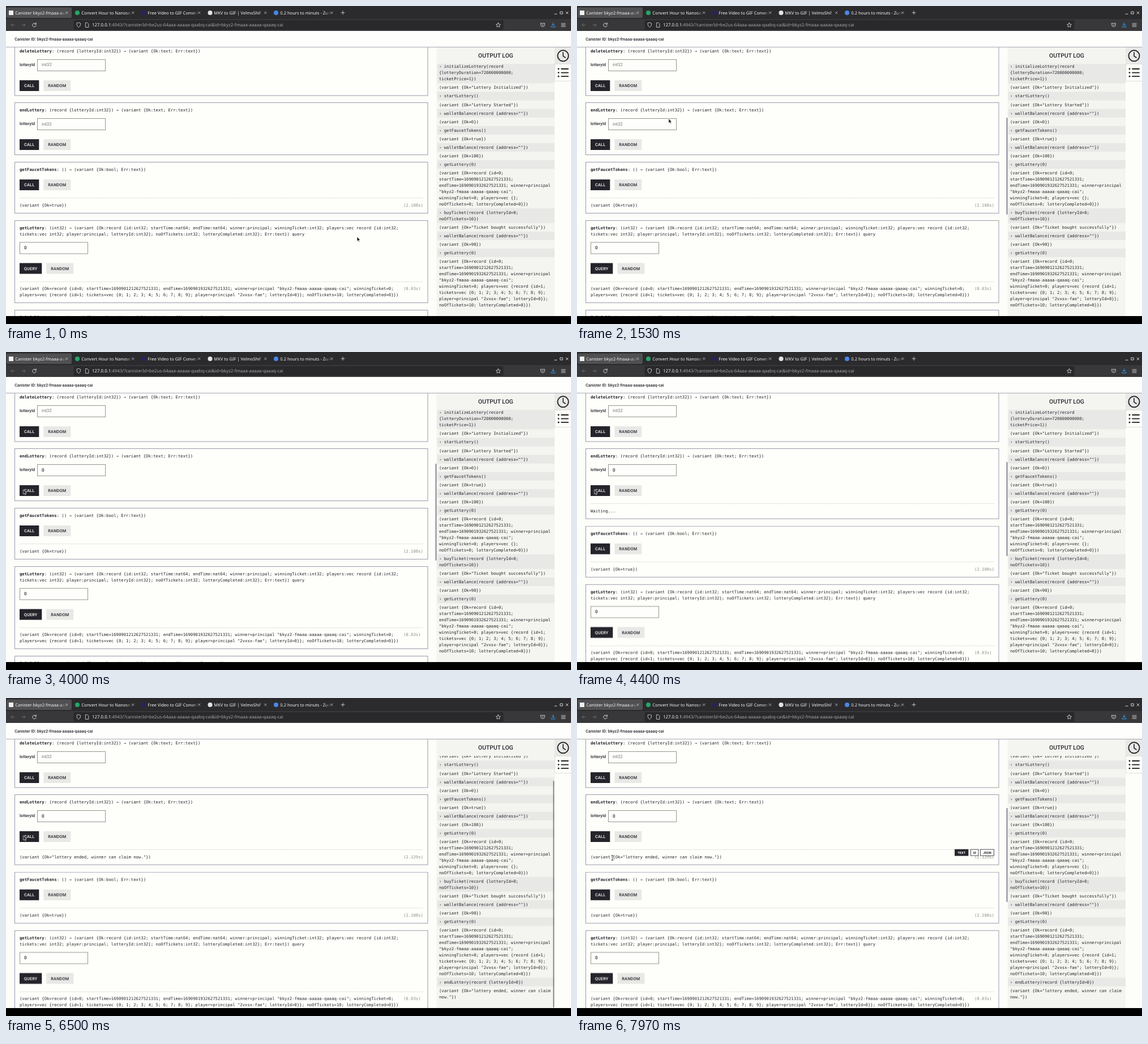
An HTML page that plays this animation: 998 px wide and 561 px high, repeating every 8 s.

```html
<!DOCTYPE html>
<html lang="en">
<head>
<meta charset="utf-8">
<title>Canister console</title>
<style>
html, body { margin: 0; width: 100%; height: 100%; overflow: hidden; background: #000; }
svg { display: block; }
text { font: 7.277px "DejaVu Sans Mono", monospace; fill: #25242b; text-rendering: geometricPrecision; white-space: pre; }
.b { font-weight: 700; }
.dim { fill: #8a8a88; }
.input { font: 500 7.9px Roboto, sans-serif; }
.hint { font: 7.9px Roboto, sans-serif; fill: #777775; }
.ui { font: 500 7.28px Roboto, sans-serif; }
.btn { font: 500 7.28px Roboto, sans-serif; letter-spacing: .2px; text-anchor: middle; }
.pill { font: 700 5.7px Roboto, sans-serif; text-anchor: middle; }
.head { font: 500 10.4px Roboto, sans-serif; text-anchor: middle; }
.tab { font: 7.55px "Noto Sans", sans-serif; fill: #f4f4f4; }
.url { font: 7.85px "Noto Sans", sans-serif; fill: #a6a6a6; }
.lit { fill: #f4f4f4; }
.w { fill: #fff; }
.line { fill: none; stroke-linecap: round; stroke-linejoin: round; }
</style>
</head>
<body>
<svg id="stage" width="998" height="561" viewBox="0 0 998 561"></svg>
<script>
const INK = '#25242b', PAGE = '#fdfdf9', EDGE = '#9a9aad', GREY = '#e8e8e6', PANEL = '#f4f4f0';
const TABS = '#2b2b2d', BAR = '#38383a', FIELD = '#29292b', ACTIVE = '#505052';
let css = '';

// Keyframe helpers; times are ms within the 8 s loop.
const anim = (name, ease, ...keys) => {
  const body = keys.map(([ms, rule]) => `${ms / 80}%{${rule}}`).join('');
  css += `@keyframes ${name}{${body}} .${name}{animation:${name} 8s ${ease} infinite}`;
};
const show = (name, ...flips) => anim(name, 'step-end', [0, 'opacity:0'],
  ...flips.map((ms, i) => [ms, `opacity:${(i + 1) % 2}`]));
const at = (x, y) => `transform:translate(${x}px,${y}px)`;

// Drawing helpers
const text = (x, y, s, cls = '') => `<text x="${x}" y="${y}" class="${cls}">${s}</text>`;
const rect = (x, y, w, h, fill, more = '') =>
  `<rect x="${x}" y="${y}" width="${w}" height="${h}" fill="${fill}" ${more}/>`;
const path = (d, stroke, width = 1, more = '') =>
  `<path d="${d}" class="line" stroke="${stroke}" stroke-width="${width}" ${more}/>`;
const dot = (x, y, r, fill) => `<circle cx="${x}" cy="${y}" r="${r}" fill="${fill}"/>`;
const group = (cls, body) => `<g class="${cls}">${body}</g>`;
const clip = (x, y, w, h, body) =>
  `<svg x="${x}" y="${y}" width="${w}" height="${h}" viewBox="${x} ${y} ${w} ${h}">${body}</svg>`;

// Timeline
const WAIT = 4070, DONE = 5930;
show('before', 0, WAIT);
show('after', WAIT);
show('waiting', WAIT, DONE);
show('done', DONE);
show('empty', 0, 2700);
show('typed', 2700);
show('caret0', 1950, 2700);
show('caret1', 2700, 3770);
show('arrow', 0, 1600, 3200, 7820);
show('beam', 1600, 3200, 7820);
show('pills', 7810);
anim('push', 'step-end', [0, at(0, 0)], [WAIT, at(0, 31.7)], [8000, at(0, 31.7)]);
anim('scroll', 'ease-in-out', [0, at(0, 0)], [DONE, at(0, 0)], [6330, at(0, -41.1)], [8000, at(0, -41.1)]);
anim('logbar', 'linear', [0, 'opacity:0'], [DONE, 'opacity:0;' + at(0, -37)],
  [6050, 'opacity:1;' + at(0, -28)], [6330, 'opacity:1;' + at(0, 0)],
  [6830, 'opacity:1;' + at(0, 0)], [7330, 'opacity:0'], [8000, 'opacity:0']);
anim('pagebar', 'linear', [0, 'opacity:0'], [30, 'opacity:0'], [130, 'opacity:1'], [2630, 'opacity:1'],
  [3000, 'opacity:0'], [3150, 'opacity:0'], [3250, 'opacity:1'], [4970, 'opacity:1'],
  [5450, 'opacity:0'], [6950, 'opacity:0'], [7050, 'opacity:1'], [8000, 'opacity:1']);
anim('move', 'ease-in-out', [0, at(620, 407)], [30, at(620, 407)], [830, at(380, 240)], [870, at(380, 240)],
  [1200, at(277, 172)], [1430, at(277, 172)], [1530, at(161.8, 198.6)], [1730, at(137, 203)],
  [3140, at(137, 203)], [3430, at(37, 240)], [3470, at(37, 240)], [3600, at(32, 243)],
  [3770, at(32, 243)], [3900, at(30.6, 242.6)], [7100, at(30.6, 242.6)], [7600, at(58, 261)],
  [7770, at(58, 261)], [7950, at(62.5, 282)], [8000, at(62.5, 282)]);

// Cards
const frame = (y, h, cls = '') => rect(15.5, y, 729.5, h, '#fefefb', `stroke="${EDGE}" class="${cls}"`);
const title = (y, name, sig) => text(24, y + 15.7, `<tspan class="b">${name}</tspan>${sig}`);
const field = (x, y) => rect(x + .5, y + .5, 120, 20, '#fefefc', 'stroke="#98958e"');
const button = (x, y, w, label, dark) =>
  rect(x, y, w, 19, dark ? INK : GREY) + text(x + w / 2, y + 12.1, label, 'btn' + (dark ? ' w' : ''));
const buttons = (y, label, w) => button(24, y, w, label, true) + button(w + 32, y, 48, 'RANDOM');
const rule = y => path(`M24 ${y}H737`, '#d2d2cc', 1, 'stroke-dasharray="1.5 1" style="stroke-linecap:butt"');
const took = (y, s) => text(702, y, `(${s}s)`, 'dim');
const hint = y => text(63, y, 'int32', 'hint');
const idField = y => text(24, y + 39.7, 'lotteryId', 'ui') + field(55, y + 27.5);
const TEXT_RESULT = ' → (variant {Ok:text; Err:text})';

function deleteCard(y) {
  return frame(y, 91.5) + title(y, 'deleteLottery', ': (record {lotteryId:int32})' + TEXT_RESULT) +
    idField(y) + hint(y + 39.9) + buttons(y + 64.5, 'CALL', 34.3);
}

function pill(x, w, label, dark) {
  return rect(x + .5, 267.1, w - 1, 11, dark ? INK : '#fff', `stroke="${INK}" stroke-width=".8"`) +
    text(x + w / 2, 274.7, label, 'pill' + (dark ? ' w' : ''));
}

function endCard(y) {
  const caret = x => path(`M${x} ${y + 33.5}V${y + 42}`, '#111', .7);
  return frame(y, 92, 'before') + frame(y, 123.7, 'after') +
    title(y, 'endLottery', ': (record {lotteryId:int32})' + TEXT_RESULT) + idField(y) +
    group('empty', hint(y + 40.3)) + group('typed', text(63, y + 40.3, '0', 'input')) +
    group('caret0', caret(63)) + group('caret1', caret(67.8)) +
    buttons(y + 64.5, 'CALL', 34.3) +
    group('after', rule(267.5)) +
    group('waiting', text(24, 283.3, 'Waiting...')) +
    group('done', text(24, 283.3, '(variant {Ok="lottery ended, winner can claim now."})') + took(283.3, '2.129')) +
    group('pills', pill(667, 24.5, 'TEXT', true) + pill(695, 14.5, 'UI') + pill(712, 25, 'JSON'));
}

function faucetCard(y) {
  return frame(y, 90) + title(y, 'getFaucetTokens', ': () → (variant {Ok:bool; Err:text})') +
    buttons(y + 30.5, 'CALL', 34.3) + rule(y + 63) +
    text(24, y + 78.7, '(variant {Ok=true})') + took(y + 78.7, '2.108');
}

function lotteryCard(y) {
  return frame(y, 145) +
    title(y, 'getLottery', ': (int32) → (variant {Ok:record {id:int32; startTime:nat64; endTime:nat64; winner:principal; winningTicket:int32; players:vec record {id:int32;') +
    text(24, y + 26.7, 'tickets:vec int32; player:principal; lotteryId:int32}; noOfTickets:int32; lotteryCompleted:int32}; Err:text}) query') +
    field(24, y + 38) + text(32, y + 50.8, '0', 'input') + buttons(y + 75, 'QUERY', 39.3) + rule(y + 108) +
    text(24, y + 122.4, '(variant {Ok=record {id=0; startTime=1690901212627521331; endTime=1690901932627521331; winner=principal "bkyz2-fmaaa-aaaaa-qaaaq-cai"; winningTicket=0;') +
    text(24, y + 133.3, 'players=vec {record {id=1; tickets=vec {0; 1; 2; 3; 4; 5; 6; 7; 8; 9}; player=principal "2vxsx-fae"; lotteryId=0}}; noOfTickets=10; lotteryCompleted=0}})') +
    took(y + 122.4, '0.03');
}

const nextCard = y => frame(y, 60) +
  title(y, 'initializeLottery', ': (record {lotteryDuration:nat64})' + TEXT_RESULT);

// Output log: entries starting with › are shaded calls, | breaks a line.
const RECORD = '(variant {Ok=record {id=0;|startTime=1690901212627521331;|endTime=1690901932627521331; winner=principal|"bkyz2-fmaaa-aaaaa-qaaaq-cai";|winningTicket=0; players=vec {';
const BALANCE = '› walletBalance(record {address=""})';
const LOG = [
  '› initializeLottery(record|{lotteryDuration=720000000000;|ticketPrice=1})',
  '(variant {Ok="Lottery Initialized"})',
  '› startLottery()', '(variant {Ok="Lottery Started"})',
  BALANCE, '(variant {Ok=0})',
  '› getFaucetTokens()', '(variant {Ok=true})',
  BALANCE, '(variant {Ok=100})',
  '› getLottery(0)', RECORD + '};|noOfTickets=0; lotteryCompleted=0}})',
  '› buyTicket(record {lotteryId=0;|noOfTickets=10})', '(variant {Ok="Ticket bought successfully"})',
  BALANCE, '(variant {Ok=90})',
  '› getLottery(0)',
  RECORD + 'record {id=1;|tickets=vec {0; 1; 2; 3; 4; 5; 6; 7; 8; 9};|player=principal "2vxsx-fae"; lotteryId=0}};|noOfTickets=10; lotteryCompleted=0}})',
  '› endLottery(record {lotteryId=0})', '(variant {Ok="lottery ended, winner can claim|now."})'
];

function logRows() {
  let y = 99.4;
  return LOG.map((entry, i) => {
    const lines = entry.split('|'), h = lines.length * 10.92 + 4.16;
    let row = entry[0] === '›' ? rect(761.5, y, 207.5, h, GREY) : '';
    lines.forEach((s, n) => row += text(765, (y + 10.06 + n * 10.92).toFixed(2), s));
    y += h;
    return i < 18 ? row : group('done', row);
  }).join('');
}

function logPanel() {
  const icon = '#1c1c20';
  return rect(760.5, 73, 208.5, 474, PANEL) + rect(969, 73, 29, 29, GREY) +
    text(865, 91.1, 'OUTPUT LOG', 'head') +
    clip(760, 102, 209, 445, group('scroll', logRows())) +
    rect(966.5, 146, 1.7, 400, '#77777f', 'rx=".8" class="logbar"') +
    path('M969 102.5H998M969 132.5H998M969.5 102V132', '#d4d4ce', 1, 'stroke-dasharray="1 1.5"') +
    `<circle cx="984" cy="87.8" r="9.6" fill="none" stroke="${icon}" stroke-width="1.8"/>` +
    path('M984 81.8V88.3L988 91', icon, 1.6) +
    [111, 117.6, 124.2].map(y => dot(976, y, 1.4, icon) + path(`M981 ${y}H993`, icon, 1.8)).join('');
}

// Browser chrome
function tab(i, label, icon) {
  const x = i * 117, fade = i ? 'fade' : 'fadeOn';
  return icon +
    clip(x + 16.3, 0, 88, 23, text(x + 16.3, 14.5, label, 'tab') + rect(x + 95.3, 3, 9, 17, `url(#${fade})`)) +
    path(`M${x + 105.5} 10l3.6 3.6m0 -3.6l-3.6 3.6`, '#d8d8d8', .7);
}

function chrome() {
  const lit = '#e6e6e6', mid = '#cfcfcf', off = '#6e6e70';
  const fade = (id, c) => `<linearGradient id="${id}"><stop stop-color="${c}" stop-opacity="0"/><stop offset="1" stop-color="${c}"/></linearGradient>`;
  return `<defs>${fade('fade', TABS)}${fade('fadeOn', ACTIVE)}</defs>` +
    rect(0, 0, 998, 23, TABS) + rect(0, 23, 998, 21, BAR) +
    rect(1, 2.5, 115, 18.5, ACTIVE, 'rx="2"') +
    tab(0, 'Canister bkyz2-fmaaa-aaaaa', rect(5, 8, 8, 8, '#f0f0f0')) +
    tab(1, 'Convert Hour to Nanosec', dot(126, 12, 4, '#27a567')) +
    tab(2, 'Free Video to GIF Convert', dot(243, 12, 4, '#2c2060')) +
    tab(3, 'MKV to GIF | VelmoShif', dot(360.5, 12, 4, '#e2e3e8')) +
    tab(4, '0.2 hours to minuts - Zun', dot(477, 12, 4, '#4a86e8')) +
    path('M592 11.8h6m-3 -3v6', lit, .8) +
    path('M969 14.2h4M979.2 10h4v4h-4zM989 10l4 4m0 -4l-4 4', lit, .9) +
    path('M15 33.5h-6m2.7 -2.7l-2.7 2.7 2.7 2.7M28 33.5h6m-2.7 -2.7l2.7 2.7 -2.7 2.7', off, .9) +
    path('M52.6 31.4a3.3 3.3 0 1 0 .7 3M53.3 29.8v2.4h-2.4', lit, .9) +
    rect(119.5, 25, 759, 17, FIELD, 'rx="2"') +
    path('M128.3 29.4l3.3 1.1c0 4 -1 5.8 -3.3 7c-2.3 -1.2 -3.3 -3 -3.3 -7z', mid, .9) +
    path('M140.8 29.5h3l2 2v6h-5z', mid, .9) +
    text(152, 36.3, '<tspan class="lit">127.0.0.1</tspan>:4943/?canisterId=be2us-64aaa-aaaaa-qaabq-cai&amp;id=bkyz2-fmaaa-aaaaa-qaaaq-cai', 'url') +
    path('M869.5 29.5l1.2 2.6 2.8 .3 -2.1 1.9 .6 2.8 -2.5 -1.4 -2.5 1.4 .6 -2.8 -2.1 -1.9 2.8 -.3z', lit, .8) +
    path('M944.5 30.5h7v2.5a3.5 3.5 0 0 1 -7 0zM946.5 32.7l1.5 1.4 1.5 -1.4', lit, .8) +
    path('M966.5 29.5v5m-2.3 -2.2l2.3 2.2 2.3 -2.2M963 35.5v1.5h7v-1.5', '#2f9bf0', 1) +
    path('M981 31h7m-7 2.6h7m-7 2.6h7', lit, .9);
}

const pageHeader = rect(0, 44, 998, 28.5, '#fefefc') + path('M0 72.5H998', '#a9a9b4', 1) +
  text(15.3, 61.2, 'Canister ID: bkyz2-fmaaa-aaaaa-qaaaq-cai', 'ui');

const pageBar = group('pagebar',
  rect(758.5, 197, 2, 171, '#85859a', 'rx="1" class="before"') +
  rect(758.5, 194, 2, 166, '#85859a', 'rx="1" class="after"'));

const BEAM = 'M-1.5 -4H1.5M0 -4V4M-1.5 4H1.5';
const cursor = group('move',
  group('arrow', '<path d="M0 0V8.2L1.9 6.5 3.2 9.3 4.5 8.7 3.2 6H5.8Z" fill="#111" stroke="#fff" stroke-width=".7"/>') +
  group('beam', path(BEAM, '#fff', 1.7) + path(BEAM, '#222', .9)));

document.head.append(Object.assign(document.createElement('style'), { textContent: css }));
document.getElementById('stage').innerHTML =
  rect(0, 0, 998, 561, PAGE) + deleteCard(66.5) + endCard(170.5) +
  group('push', faucetCard(275.5) + lotteryCard(378.5) + nextCard(536.5)) +
  logPanel() + pageBar + pageHeader + chrome() + rect(0, 547, 998, 14, '#000') + cursor;
</script>
</body>
</html>
```
